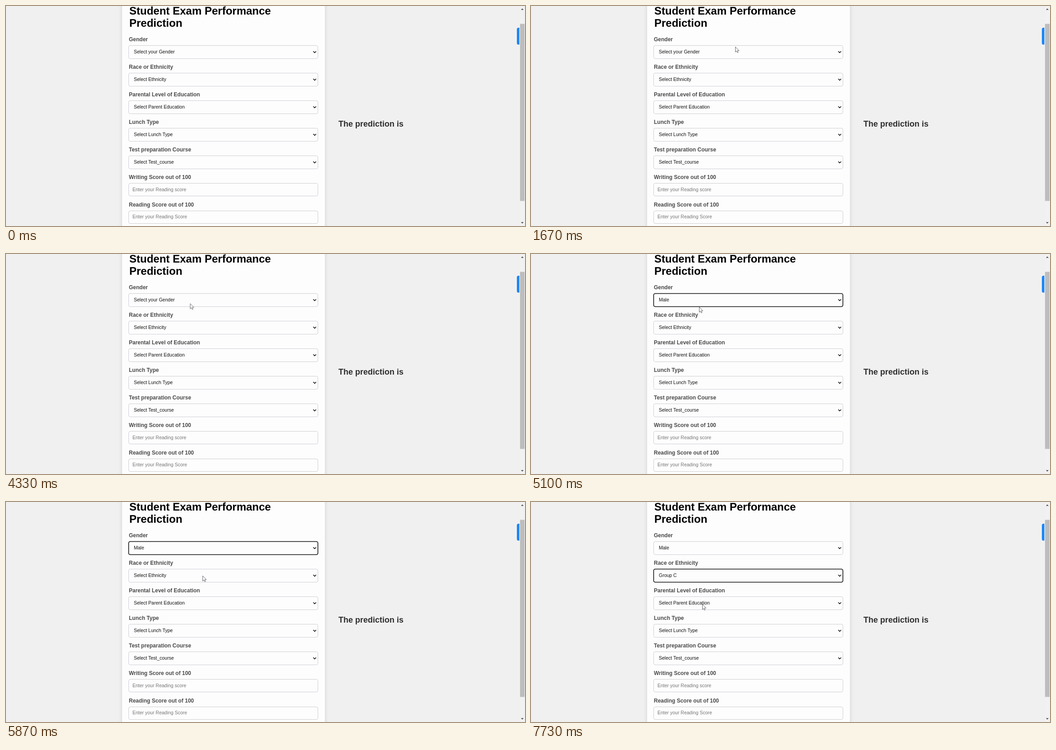
Write an HTML page that moves like this. It is 1149 px wide and 487 px high and loops after 8 s.

```html
<!DOCTYPE html>
<html lang="en">
<head>
<meta charset="utf-8">
<title>Student Exam Performance Prediction</title>
<style>
  html, body { margin: 0; width: 100%; height: 100%; overflow: hidden; background: #f0f0f0; }
  svg { display: block; width: 1149px; height: 487px; }
  text { font-family: "Liberation Sans", Arial, sans-serif; font-size: 10.5px; fill: #111; }
  .title { font-size: 24px; font-weight: bold; fill: #000; }
  .label { font-size: 12px; font-weight: bold; fill: #4a4a4a; }
  .hint { fill: #757575; }
  .result { font-size: 18px; font-weight: bold; fill: #2e2e2e; }
  .sheet { fill: #fdfdfd; filter: drop-shadow(0 0 4px rgba(0, 0, 0, .13)); }
  .field { fill: #fdfdfd; stroke: #cfced6; }
  .ring { fill: none; stroke: #101010; stroke-width: 1.6; }
  .chevron { fill: none; stroke: #111; stroke-width: 1.5; }

  /* 8 s on a 30 Hz grid: one tick is 1/240 of the loop */
  .anim { animation: 8s -4ms step-end infinite; }
  .gender-off { animation-name: gender-off; }
  .gender-on { animation-name: gender-on; }
  .gender-ring { animation-name: gender-ring; }
  .group-off { animation-name: group-off; }
  .group-on { animation-name: group-on; }
  .pointer { animation-name: pointer; }

  @keyframes gender-off { 0% { opacity: 1 } 63.75%, 100% { opacity: 0 } }
  @keyframes gender-on { 0% { opacity: 0 } 63.75%, 100% { opacity: 1 } }
  @keyframes gender-ring { 0% { opacity: 0 } 63.75% { opacity: 1 } 77.0833%, 100% { opacity: 0 } }
  @keyframes group-off { 0% { opacity: 1 } 94.5833%, 100% { opacity: 0 } }
  @keyframes group-on { 0% { opacity: 0 } 94.5833%, 100% { opacity: 1 } }

  @keyframes pointer {
    0% { opacity: 0; transform: translate(560px, 4px); }
    7.0833% { opacity: 1; transform: translate(560px, 4px); animation-timing-function: steps(10); }
    11.25% { transform: translate(515px, 62px); animation-timing-function: steps(9); }
    15% { transform: translate(497px, 92px); }
    18.75% { transform: translate(497px, 92px); animation-timing-function: steps(5); }
    20.8333% { transform: translate(452px, 90px); animation-timing-function: steps(8); }
    24.1667% { transform: translate(421px, 106px); animation-timing-function: steps(6); }
    26.6667% { transform: translate(427px, 105px); }
    53.75% { transform: translate(427px, 105px); animation-timing-function: steps(3); }
    55% { transform: translate(368px, 118px); animation-timing-function: steps(2); }
    55.8333% { transform: translate(372px, 117px); }
    64.5833% { transform: translate(374px, 138px); }
    67.5% { transform: translate(374px, 138px); animation-timing-function: steps(14); }
    73.3333% { transform: translate(435px, 163px); }
    75% { transform: translate(434px, 164px); }
    80% { transform: translate(434px, 164px); animation-timing-function: steps(5); }
    82.0833% { transform: translate(413px, 177px); }
    95.4167% { transform: translate(382px, 224px); }
    96.6667%, 100% { opacity: 1; transform: translate(379px, 226px); }
  }
</style>
</head>
<body>
<svg viewBox="0 0 1149 487" xmlns="http://www.w3.org/2000/svg">
  <defs>
    <rect id="box" x="271.5" y="87.5" width="419" height="29" rx="3.5"/>
    <g id="select">
      <use href="#box" class="field"/>
      <path class="chevron" d="M680.2 100.2l3.2 3.2 3.2-3.2"/>
    </g>
  </defs>

  <rect width="1149" height="487" fill="#f0f0f0"/>
  <rect class="sheet" x="257" y="-30" width="449" height="547"/>

  <text class="title" x="273" y="19">Student Exam Performance</text>
  <text class="title" x="273" y="46">Prediction</text>

  <g>
    <text class="label" x="272" y="78">Gender</text>
    <use href="#select"/>
    <text class="anim gender-off" x="283" y="105">Select your Gender</text>
    <text class="anim gender-on" x="283" y="105">Male</text>
    <use href="#box" class="ring anim gender-ring"/>
  </g>
  <g transform="translate(0 61)">
    <text class="label" x="272" y="78">Race or Ethnicity</text>
    <use href="#select"/>
    <text class="anim group-off" x="283" y="105">Select Ethnicity</text>
    <text class="anim group-on" x="283" y="105">Group C</text>
    <use href="#box" class="ring anim group-on"/>
  </g>
  <g transform="translate(0 122)">
    <text class="label" x="272" y="78">Parental Level of Education</text>
    <use href="#select"/>
    <text x="283" y="105">Select Parent Education</text>
  </g>
  <g transform="translate(0 183)">
    <text class="label" x="272" y="78">Lunch Type</text>
    <use href="#select"/>
    <text x="283" y="105">Select Lunch Type</text>
  </g>
  <g transform="translate(0 244)">
    <text class="label" x="272" y="78">Test preparation Course</text>
    <use href="#select"/>
    <text x="283" y="105">Select Test_course</text>
  </g>

  <text class="label" x="272" y="383">Writing Score out of 100</text>
  <rect class="field" x="271.5" y="392.5" width="419" height="28" rx="3.5"/>
  <text class="hint" x="280" y="410">Enter your Reading score</text>

  <text class="label" x="272" y="444">Reading Score out of 100</text>
  <rect class="field" x="271.5" y="453.5" width="419" height="28" rx="3.5"/>
  <text class="hint" x="280" y="470">Enter your Reading Score</text>

  <text class="result" x="736" y="267">The prediction is</text>

  <path d="M1136.5 48h-2a3.5 3.5 0 0 0-3.5 3.5v30.500a3.500 3.500 0 0 0 3.500 3.500h2z" fill="#1a86f5"/>
  <rect x="1137" width="12" height="487" fill="#f1f1f1"/>
  <rect x="1138" y="39.500" width="10" height="392" fill="#bdbdbd"/>
  <path d="M1140 8.500l3-3 3 3zM1140 478.500l3 3 3-3z" fill="#444"/>

  <path class="anim pointer" d="M.5.5V12l2.700-2.500 1.800 4 1.700-.8-1.700-3.900h3.600z"
        fill="#fff" stroke="#55555f" stroke-width=".9"/>
</svg>
</body>
</html>
```
